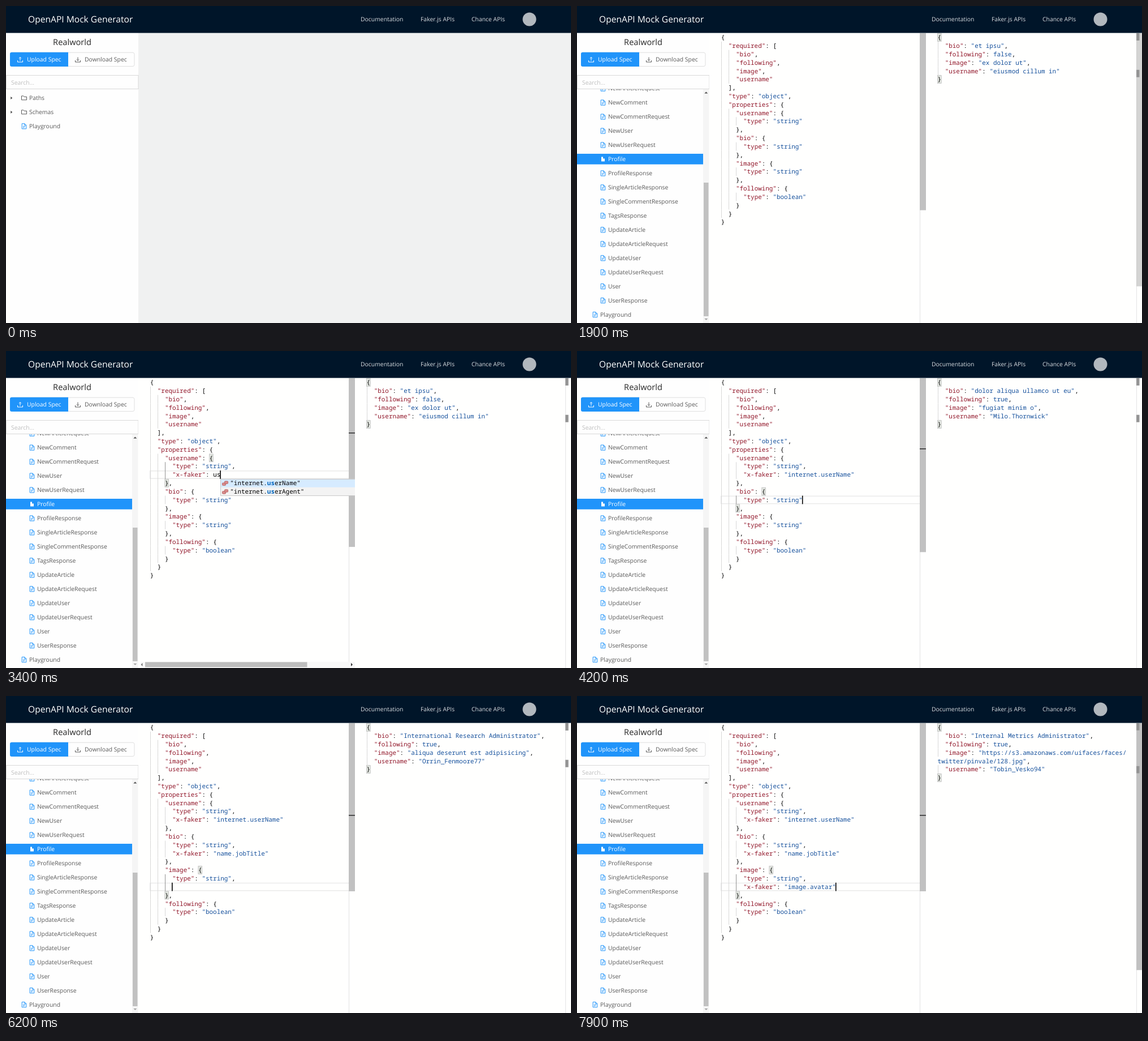
These frames come from a looping animation (999x560 px, 8 s). An HTML page:

```html
<!DOCTYPE html>
<html lang="en">
<head>
<meta charset="utf-8">
<title>OpenAPI Mock Generator</title>
<style>
  html, body { margin: 0; width: 100%; height: 100%; overflow: hidden; background: #f0f1f1; }
  svg { display: block; width: 999px; height: 560px; text-rendering: geometricPrecision; }
  text { font-family: "Open Sans", "Noto Sans", sans-serif; font-size: 10.4px; fill: #595959; }
  .code text { font-family: "Noto Sans Mono", "DejaVu Sans Mono", monospace; font-size: 10.927px; fill: #000; }
  .code .key { fill: #911629; }
  .code .value { fill: #15509c; }
  .code .match { fill: #0066bf; font-weight: bold; }
</style>
</head>
<body>
<svg id="stage" viewBox="0 0 999 560"></svg>
<script>
const LOOP = 8000, STEP = 100;
const TOP = 48, LINE = 14.829, CHAR = 6.556;
const LEFT = 254.7, RIGHT = 637.6, SPLIT = 617;
const BLUE = '#2094fa', WHITE = '#fffffe';

// ---------- drawing helpers ----------
const rect = (x, y, w, h, fill, extra = '') =>
  `<rect x="${x}" y="${y}" width="${w}" height="${h}" fill="${fill}" ${extra}/>`;
const label = (x, y, str, extra = '') => `<text x="${x}" y="${y}" ${extra}>${str}</text>`;
const path = (x, y, d, extra) => `<path transform="translate(${x} ${y})" d="${d}" ${extra}/>`;
const outline = color => `fill="none" stroke="${color}"`;
const lineY = i => TOP + i * LINE;

// ---------- header and sidebar ----------
const schemas = ('Article Comment GenericErrorModel LoginUser LoginUserRequest MultipleArticlesResponse ' +
  'MultipleCommentsResponse NewArticle NewArticleRequest NewComment NewCommentRequest NewUser ' +
  'NewUserRequest Profile ProfileResponse SingleArticleResponse SingleCommentResponse TagsResponse ' +
  'UpdateArticle UpdateArticleRequest UpdateUser UpdateUserRequest User UserResponse').split(' ');
const ROW = 24.975, MAX_SCROLL = 266.5;

function header() {
  const link = (x, str) => label(x, 26.7, str, 'style="fill:#d8dce0"');
  return rect(0, 0, 999, 47.6, '#001529') +
    label(39, 29.4, 'OpenAPI Mock Generator', 'style="font-size:15.6px;fill:#fff"') +
    link(627, 'Documentation') + link(733, 'Faker.js APIs') + link(823, 'Chance APIs') +
    '<circle cx="925.5" cy="23.5" r="12" fill="#b2b8be"/>';
}

function sidebarTop() {
  const tray = 'M-4.5 1.5v3h9v-3';
  return rect(0, 47, 234, 100, '#fefefe') +
    label(117, 68.5, 'Realworld', 'text-anchor="middle" style="font-size:14.6px;fill:#262626"') +
    rect(7.5, 82.2, 219.5, 24.4, '#fefefe', 'rx="3" stroke="#d9d9d9" stroke-width=".8"') +
    path(7, 81.8, 'M3 0H103V25.2H3Q0 25.2 0 22.2V3Q0 0 3 0', `fill="${BLUE}"`) +
    path(25, 94.5, tray + 'M0 2v-6M-2 -2l2-2 2 2', outline('#fff')) +
    label(37, 98.4, 'Upload Spec', 'style="fill:#fff"') +
    path(127, 94.5, tray + 'M0 -4v6M-2 0l2 2 2-2', outline('#595959')) +
    label(139, 98.4, 'Download Spec') +
    rect(.5, 122.5, 233.5, 24, '#fefefe', 'stroke="#d9d9d9"') +
    label(9, 138.8, 'Search...', 'style="fill:#bfbfbf"');
}

function treeRow(name, y, level, kind, open, selected) {
  const x = 32 + 14 * level, iconY = y + .4;
  let out = selected ? rect(0, y - 9.1, 223, 18.7, BLUE) : '';
  if (kind === 'folder') {
    out += path(9.5, iconY, open ? 'M-2.5-1.2h5l-2.5 3z' : 'M-1.2-2.5v5l3-2.5z', 'fill="#444"') +
      path(x, iconY, 'M-4.5 3.5v-7h3.3l1.4 1.5h4.3v5.5z', outline('#595959'));
  } else {
    out += selected
      ? path(x, iconY, 'M-3-4h3v3h3v5h-6z', 'fill="#fff"')
      : path(x, iconY, 'M-3.8-4.6h4.8l2.8 2.8v6.4h-7.6zM.8-4.4v2.8h2.8M-2 .4h4M-2 2.4h2.5', outline(BLUE));
  }
  return out + label(x + 9, y + 3.7, name, selected ? 'style="fill:#fff"' : '');
}

function sidebar(t) {
  const open = t >= 200;
  const p = Math.min(1, Math.max(0, (t - 300) / 400));
  const scroll = MAX_SCROLL * p * p * (3 - 2 * p);
  const rows = [['Paths', 0, 'folder'], ['Schemas', 0, 'folder', open],
    ...(open ? schemas.map(name => [name, 1, 'file', false, name === 'Profile' && t >= 800]) : []),
    ['Playground', 0, 'file']];
  let out = rect(0, 47, 234, 513, '#fefefe');
  rows.forEach(([name, ...rest], i) => {
    const y = 162 + ROW * i - scroll;
    if (y > 135 && y < 575) out += treeRow(name, y, ...rest);
  });
  if (open) {
    out += rect(223, 147, 10.5, 413, '#f5f5f5') +
      rect(224, 158 + 154 * scroll / MAX_SCROLL, 8.5, 236, '#c1c1c1') +
      path(228.3, 153, 'M-3 1.5h6l-3-3z', `fill="${scroll ? '#505050' : '#a3a3a3'}"`) +
      path(228.3, 553.5, 'M-3-1.5h6l-3 3z', `fill="${p < 1 ? '#505050' : '#a3a3a3'}"`);
  }
  return out + sidebarTop();
}

// ---------- editor content over time ----------
const NEXT = ',\n      ', KEY = NEXT + '"x-faker":';
const group = (prefix, names) => names.split(' ').map(name => prefix + '.' + name);
const keys = ['*x-*faker', '*x-*chance'];
const addressList = group('address', 'zipCode city cityPrefix citySuffix streetName streetAddress ' +
  'streetSuffix streetPrefix secondaryAddress county country countryCode');
const internetList = group('internet', 'userName protocol url domainName domainSuffix domainWord ip ipv6 ' +
  'userAgent color mac password');
const nameList = [...group('name', 'jobTitle jobType lastName prefix suffix title'),
  ...group('phone', 'phoneFormats phoneNumber phoneNumberFormat'),
  ...group('random', 'alphaNumeric arrayElement boolean')];

// [time, edited property, text after its type, suggestions]
const edits = [
  [2000, 0, ''], [2200, 0, ','], [2300, 0, NEXT], [2500, 0, NEXT + 'x'], [2600, 0, NEXT + 'x-'],
  [2700, 0, NEXT + 'x-', keys], [3100, 0, KEY], [3300, 0, KEY + ' ', addressList],
  [3400, 0, KEY + ' us', ['internet.*us*erName', 'internet.*us*erAgent']],
  [3500, 0, KEY + ' usern', ['internet.*userN*ame']],
  [3800, 0, KEY + ' "internet.userName"'],
  [4200, 1, ''], [4300, 1, ','], [4400, 1, NEXT], [4800, 1, NEXT + 'x-', keys], [5000, 1, KEY],
  [5100, 1, KEY + ' ', internetList],
  [5200, 1, KEY + ' job', ['name.*job*Title', 'name.*job*Descriptor', 'name.*job*Area', 'name.*job*Type']],
  [5300, 1, KEY + ' jobti', ['name.*jobTi*tle', 'name.*job*Descr*i*p*t*or']],
  [5700, 1, KEY + ' "name.jobTitle"'],
  [5900, 2, ''], [6000, 2, ','], [6200, 2, NEXT], [6300, 2, NEXT + 'x'], [6400, 2, NEXT + 'x-', keys],
  [6800, 2, KEY], [6900, 2, KEY, nameList], [7000, 2, KEY + ' ', nameList],
  [7100, 2, KEY + ' a', ['image.*a*vatar', 'internet.*a*vatar', 'image.*a*bstract', 'image.*a*nimals']],
  [7200, 2, KEY + ' ava', ['image.*ava*tar', 'internet.*ava*tar']],
  [7300, 2, KEY + ' avat', ['image.*avat*ar', 'internet.*avat*ar']],
  [7600, 2, KEY + ' "image.avatar"']
];

// [time, bio, following, image, username]
const results = [
  [1800, 'et ipsu', false, 'ex dolor ut', 'eiusmod cillum in'],
  [3900, 'dolor aliqua ullamco ut eu', true, 'fugiat minim o', 'Milo.Thornwick'],
  [5800, 'International Research Administrator', true, 'aliqua deserunt est adipisicing', 'Orrin_Fenmoore77'],
  [7700, 'Internal Metrics Administrator', true,
    'https://s3.amazonaws.com/uifaces/faces/\ntwitter/pinvale/128.jpg', 'Tobin_Vesko94']
];

const property = (name, type, extra = '') => `    "${name}": {\n      "type": "${type}"${extra}\n    }`;
const schemaText = extras => `{
  "required": [
    "bio",
    "following",
    "image",
    "username"
  ],
  "type": "object",
  "properties": {
${['username', 'bio', 'image'].map((name, i) => property(name, 'string', extras[i])).join(',\n')},
${property('following', 'boolean')}
  }
}`;
const resultText = ([, bio, following, image, username]) => `{
  "bio": "${bio}",
  "following": ${following},
  "image": "${image}",
  "username": "${username}"
}`;

// ---------- editor drawing ----------
const TOKENS = /"[^"]*"?|true|false|\w+\/[^,]*|[^\s"]+/g;
const ARRAY_ITEM = /^ *"[^"]*",?$/;

function codeLine(line, x, i) {
  let out = '';
  for (let k = 0; k < line.match(/^ */)[0].length; k += 2)
    out += rect(Math.round(x + k * CHAR), lineY(i), 1, LINE, '#d8d8d8');
  for (const { 0: token, index } of line.matchAll(TOKENS)) {
    const quoted = token[0] === '"';
    const type = quoted && (line[index + token.length] === ':' || ARRAY_ITEM.test(line)) ? 'key'
      : quoted || /^(true|false)$|\//.test(token) ? 'value' : '';
    out += label(x + index * CHAR, lineY(i) + 11.2, token, `class="${type}"`);
  }
  return out;
}
const codeLines = (lines, x) => lines.map((line, i) => codeLine(line, x, i)).join('');
const bracketBox = (x, col, i) =>
  rect(x + col * CHAR, lineY(i) + .5, CHAR, LINE - 1, '#e4e8e2', 'stroke="#b9b9b9" stroke-width=".8"');

function suggestions(items, x, y) {
  const width = SPLIT - x;
  let out = rect(x, y, width, items.length * LINE, '#f3f3f3') + rect(x, y, width, LINE, '#d6ebff');
  items.forEach((item, i) => {
    const top = y + i * LINE;
    let col = 0;
    out += rect(x + 3.5, top + 7, 6, 4.5, '#d98c8c', 'rx="1" stroke="#b35e5e" stroke-width=".8"') +
      rect(x + 7.5, top + 4, 6, 4.5, '#d98c8c', 'rx="1" stroke="#b35e5e" stroke-width=".8"');
    `"${item}"`.split('*').forEach((part, k) => {
      out += label(x + 17.3 + col * CHAR, top + 11.2, part, k % 2 ? 'class="match"' : '');
      col += part.length;
    });
  });
  return out + path(x, y, `M${width} .5H.5V${items.length * LINE}H${width}`, outline('#c8c8c8'));
}

function leftEditor(t) {
  const extras = ['', '', ''];
  let current;
  for (const edit of edits) if (edit[0] <= t) extras[(current = edit)[1]] = edit[2];
  const lines = schemaText(extras).split('\n');
  const popup = current && current[3];
  // a long list opens first; the view makes room for the scrollbar one step later
  const view = popup && (popup.length < 12 || t > current[0]) ? 501 : 512;
  const content = (lines.length - 1) * LINE + view;
  let back = '', mark = '', front = '';

  if (current) {
    const name = ['username', 'bio', 'image'][current[1]];
    const open = lines.findIndex(line => line.startsWith(`    "${name}": {`));
    const close = lines.findIndex((line, i) => i > open && line.startsWith('    }'));
    const row = close - 1;
    const cursorX = LEFT + lines[row].length * CHAR;
    back = rect(LEFT, lineY(row) + .75, SPLIT - LEFT - .7, LINE - 1.5, 'none', 'stroke="#eaeaea" stroke-width="1.5"') +
      bracketBox(LEFT, lines[open].length - 1, open) + bracketBox(LEFT, 4, close);
    mark = rect(606, Math.round(TOP + row * LINE * view / content) - 1, 11, 1.6, '#333');
    front = rect(Math.round(LEFT + 4 * CHAR), lineY(open + 1), 1, (close - open - 1) * LINE, '#939393') +
      rect(cursorX - 1, lineY(row), 1.6, LINE, '#000');
    if (popup) {
      const thumb = 360 * 379 / (cursorX - 238 + 335);
      mark += rect(238, 549, 379, 11, '#f8f8f8') + rect(246, 549.5, thumb, 9, '#bdbdbd') +
        path(240, 554, 'M1.5-3v6l-3-3z', 'fill="#777"') + path(611.5, 554, 'M-1.5-3v6l3-3z', 'fill="#333"');
      front += suggestions(popup, Math.round(cursorX), lineY(row + 1));
    }
  }
  return rect(234, 47, 383, 513, WHITE) + back + codeLines(lines, LEFT) +
    rect(606, TOP, 1, 512, '#e2e2e2') +
    rect(606, TOP, 11, view * view / content, '#c1c1c1') + mark + front;
}

function rightEditor(t) {
  let out = rect(SPLIT, 47, 382, 513, WHITE) + rect(989, TOP, 1, 512, '#e4e4e4');
  const result = results.filter(r => r[0] <= t).pop();
  if (!result) return out;
  const lines = resultText(result).split('\n'), last = lines.length - 1;
  const content = last * LINE + 512, ratio = 512 / content;
  // the scrollbar fades in when the number of lines changes, then out again
  const fade = (from, to) => Math.max(0, Math.min(1, .35 + (t - from) / 300, (to - t) / 400));
  const opacity = t < 2800 ? fade(1800, 2800) : t < 7700 ? 0 : fade(7700, 8700);
  out += bracketBox(RIGHT, 0, 0) + bracketBox(RIGHT, 0, last) + codeLines(lines, RIGHT) +
    rect(989, TOP, 10, 512 * ratio, '#c1c1c1', `opacity="${opacity}"`);
  for (const i of [0, last])
    out += rect(989, TOP + i * LINE * ratio, 5.5, LINE * ratio, '#949494');
  return out;
}

// ---------- playback ----------
const stage = document.getElementById('stage');
let shown = -1;

function play() {
  const t = Math.floor(performance.now() % LOOP / STEP) * STEP;
  if (t !== shown) {
    shown = t;
    const editors = t < 1600 ? '' : `<g class="code">${leftEditor(t)}${rightEditor(t)}</g>`;
    stage.innerHTML = rect(0, 0, 999, 560, '#f0f1f1') + sidebar(t) + editors + header();
  }
  requestAnimationFrame(play);
}
play();
</script>
</body>
</html>
```
